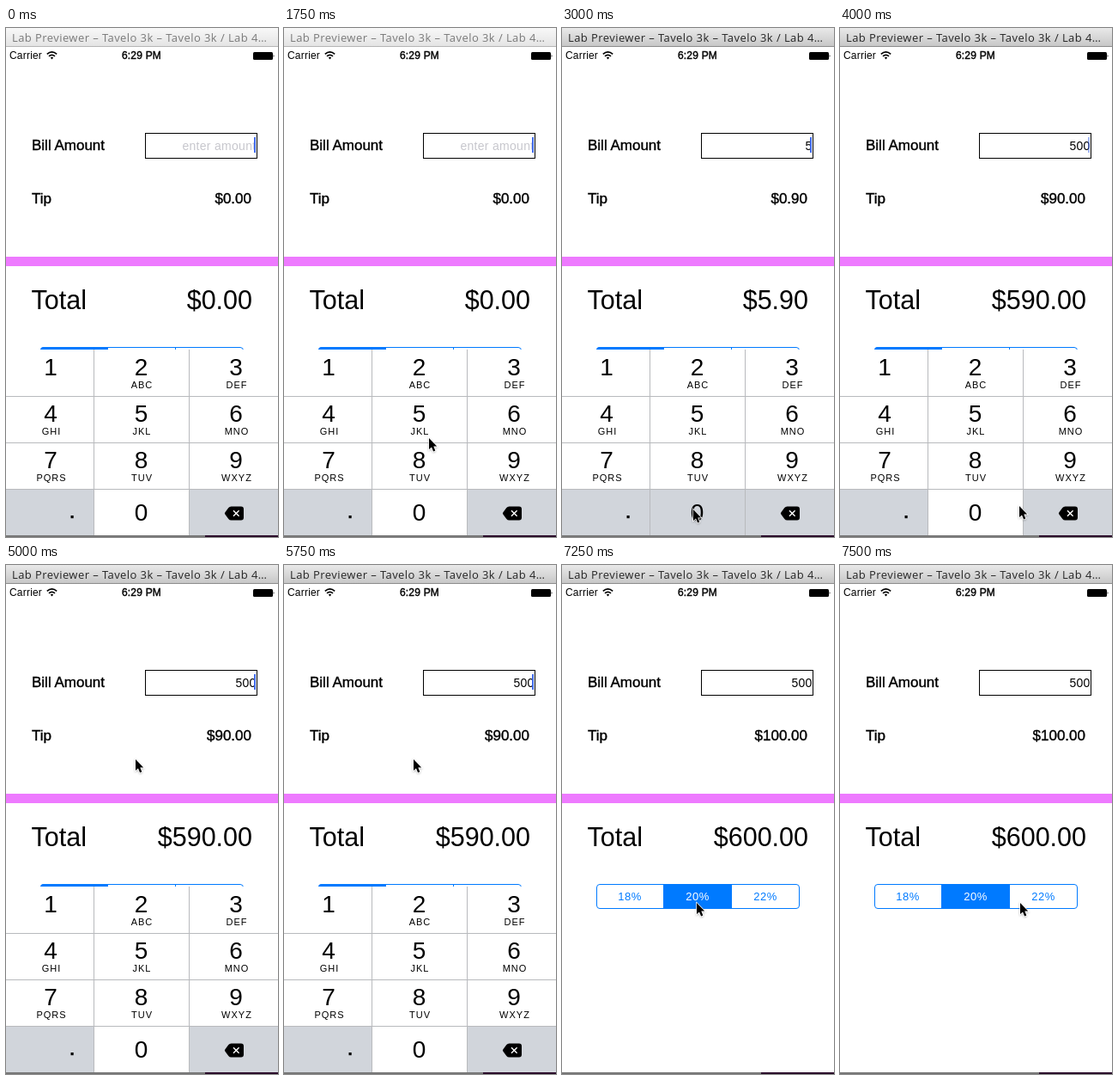
An HTML page for the animation above (8 s loop, 317 by 592 pixels).

```html
<!DOCTYPE html>
<html lang="en">
<head>
<meta charset="utf-8">
<title>Tip calculator</title>
<style>
  html, body { margin: 0; width: 100%; height: 100%; overflow: hidden; background: #fff; }
  svg { display: block; width: 100%; height: 100%; font-family: "Liberation Sans", Arial, sans-serif; }
  .title { font: 13px "Open Sans", sans-serif; letter-spacing: .43px; }
  .medium { font-size: 17px; stroke: #000; stroke-width: .4px; }
  .clock { font-size: 12px; stroke: #000; stroke-width: .4px; letter-spacing: .2px; }
  .carrier { font-size: 12px; letter-spacing: .2px; }
  .field { font-size: 14px; letter-spacing: .2px; }
  .total { font-size: 30.5px; }
  .segment { font-size: 13px; letter-spacing: .5px; }
  .digit { font-size: 28px; }
  .letters { font-size: 11px; letter-spacing: 1px; }
  .end { text-anchor: end; }
  .mid { text-anchor: middle; }
</style>
</head>
<body>
<svg viewBox="0 0 317 592">
  <defs>
    <linearGradient id="bar" x2="0" y2="1">
      <stop id="barTop"/><stop id="barBottom" offset="1"/>
    </linearGradient>
    <clipPath id="screen"><path d="M0 22H317V590H0Z"/></clipPath>
    <clipPath id="rounded"><rect x="40" y="371" width="237" height="29" rx="4"/></clipPath>
    <filter id="shadow" x="-50%" y="-50%" width="220%" height="220%">
      <feDropShadow dx="0" dy="1" stdDeviation=".8" flood-opacity=".3"/>
    </filter>
  </defs>
  <rect width="317" height="592" fill="#fff"/>

  <rect width="317" height="22" fill="url(#bar)"/>
  <path id="barEdge" d="M0 21.5H317"/>
  <text id="title" class="title" x="7" y="16">Lab Previewer – Tavelo 3k – Tavelo 3k / Lab 4…</text>

  <text class="carrier" x="4" y="36">Carrier</text>
  <g fill="none" stroke="#000" stroke-width="1.7">
    <path d="M47.8 30.4Q53.5 25.4 59.2 30.4M50 32.9Q53.5 29.8 57 32.9"/>
    <path d="M53.5 36.4L51.8 34.5Q53.5 33.2 55.2 34.5Z" fill="#000" stroke="none"/>
  </g>
  <text class="clock mid" x="158" y="36">6:29 PM</text>
  <rect x="288" y="28" width="23" height="9" rx="1.5"/>
  <path d="M311.7 30.7Q313.4 32.5 311.7 34.3Z"/>

  <text class="medium" x="30" y="142">Bill Amount</text>
  <rect x="162.5" y="122.5" width="130" height="29" fill="none" stroke="#000"/>
  <text id="bill" class="field end" x="291.5" y="142"></text>
  <rect id="caret" x="289" y="127" width="2" height="18" fill="#426bf2"/>
  <text class="medium" x="30" y="204">Tip</text>
  <text id="tip" class="medium end" x="286" y="204"></text>
  <rect y="266" width="317" height="11" fill="#ee7aff"/>
  <text class="total" x="29.5" y="327">Total</text>
  <text id="total" class="total end" x="287" y="327"></text>

  <rect id="selected" y="371" width="79" height="29" fill="#007aff" clip-path="url(#rounded)"/>
  <rect x="40.5" y="371.5" width="236" height="28" rx="3.5" fill="none" stroke="#007aff"/>
  <path d="M118.5 371V400M197.5 371V400" stroke="#007aff"/>
  <g id="segments"></g>

  <g clip-path="url(#screen)"><g id="keyboard"></g></g>
  <rect y="590" width="317" height="2" fill="#777"/>
  <rect x="232" y="590" width="85" height="2" fill="#2b0d2b"/>
  <path id="cursor" d="M0 0V13L3 10.4L5.1 15.4L7.3 14.4L5.3 9.5H9.2Z"
        stroke="#fff" stroke-width="1.4" paint-order="stroke" filter="url(#shadow)"/>
</svg>
<script>
const STEP = 250, LOOP = 8000;
const RATES = [18, 20, 22];
const el = id => document.getElementById(id);
const text = (cls, x, y, s) => `<text class="${cls}" x="${x}" y="${y}">${s}</text>`;
const rect = (x, y, w, h, fill, id = "") =>
  `<rect id="${id}" x="${x}" y="${y}" width="${w}" height="${h}" fill="${fill}"/>`;

function buildKeyboard() {
  const centers = [157.5, 268, 52];
  const letters = ["", "ABC", "DEF", "GHI", "JKL", "MNO", "PQRS", "TUV", "WXYZ"];
  const keys = letters.map((s, i) => {
    const x = centers[(i + 2) % 3], y = 404 + 54 * Math.floor(i / 3);
    return text("digit mid", x, y, i + 1) + text("letters mid", x + 1, y + 15, s);
  }).join("");
  el("keyboard").innerHTML =
    rect(0, 374, 317, 216, "#fff") +
    rect(0, 537, 102, 53, "#d1d5db") + rect(214, 537, 103, 53, "#d1d5db") +
    rect(103, 429, 110, 53, "#d1d5db", "key5") + rect(103, 537, 110, 53, "#d1d5db", "key0") +
    `<path d="M0 428.5H317M0 482.5H317M0 536.5H317M102.5 374V590M213.5 374V590" stroke="#b8babd"/>` +
    keys + text("digit mid", 157.5, 573, 0) + rect(75.5, 567, 3.2, 3.2, "#000") +
    `<path d="M255.4 565.8Q254.4 564.5 255.4 563.2L259.3 558Q260.5 556.5 262.5 556.5H274Q277 556.5 277 559.5V569.5Q277 572.5 274 572.5H262.5Q260.5 572.5 259.3 571Z"/>
     <path d="M265 561.2L271.6 567.8M271.6 561.2L265 567.8" stroke="#fff" stroke-width="1.4"/>`;
}

// Value of the latest [time, value] entry at or before t.
const at = (track, t) => track.filter(([start]) => start <= t).pop()[1];

const track = {
  pointer: [[0, null], [1500, [196, 446]], [1750, [169, 477]], [2000, [167, 464]], [2250, [167, 456]],
    [2750, [158, 522]], [3000, [153, 560]], [4000, [209, 556]], [4250, [208, 480]], [4500, [188, 355]],
    [4750, [163, 262]], [5000, [151, 226]], [6000, [150, 260]], [6250, [147, 414]],
    [6500, [153, 400]], [6750, [157, 393]], [7500, [210, 393]]],
  bill: [[0, ""], [2750, "5"], [3250, "50"], [3500, "500"]],
  pressed: [[0, ""], [2500, "key5"], [2750, ""], [3000, "key0"], [3500, ""]],
  caret: [[0, 1], [250, 0], [750, 1], [1250, 0], [1750, 1], [2250, 0], [2500, 1],
    [4000, .5], [4250, 0], [4750, 1], [5250, 0], [5750, 1], [6000, 0]],
  slide: [[0, 0], [6000, 90], [6250, 211], [6500, 216]],
  choice: [[0, 0], [7250, 1]]
};

const money = n => "$" + n.toFixed(2);

function render(time) {
  const t = Math.floor(time % LOOP / STEP) * STEP;
  const now = name => at(track[name], t);

  const active = t >= 2500;
  el("barTop").setAttribute("stop-color", active ? "#e9e9e9" : "#f8f8f8");
  el("barBottom").setAttribute("stop-color", active ? "#c6c6c6" : "#e3e3e3");
  el("barEdge").setAttribute("stroke", active ? "#8c8c8c" : "#b5b5b5");
  el("title").setAttribute("fill", active ? "#262626" : "#7a7a7a");

  const bill = now("bill"), choice = now("choice");
  const tip = bill * RATES[choice] / 100;
  el("bill").textContent = bill || "enter amount";
  el("bill").setAttribute("fill", bill ? "#000" : "#c7c7cd");
  el("bill").style.letterSpacing = bill ? ".2px" : ".3px";
  el("caret").setAttribute("opacity", now("caret"));
  el("tip").textContent = money(tip);
  el("total").textContent = money(+bill + tip);

  el("selected").setAttribute("x", 40 + 79 * choice);
  [...el("segments").children].forEach((label, i) =>
    label.setAttribute("fill", i === choice ? "#fff" : "#007aff"));

  el("keyboard").setAttribute("transform", `translate(0 ${now("slide")})`);
  for (const key of ["key5", "key0"])
    el(key).setAttribute("visibility", key === now("pressed") ? "visible" : "hidden");

  const pointer = now("pointer");
  el("cursor").setAttribute("visibility", pointer ? "visible" : "hidden");
  if (pointer) el("cursor").setAttribute("transform", `translate(${pointer})`);
}

buildKeyboard();
el("segments").innerHTML = RATES.map((r, i) => text("segment mid", 79 + 79 * i, 390, r + "%")).join("");

const start = performance.now();
function tick() {
  render(performance.now() - start);
  requestAnimationFrame(tick);
}
tick();
</script>
</body>
</html>
```
